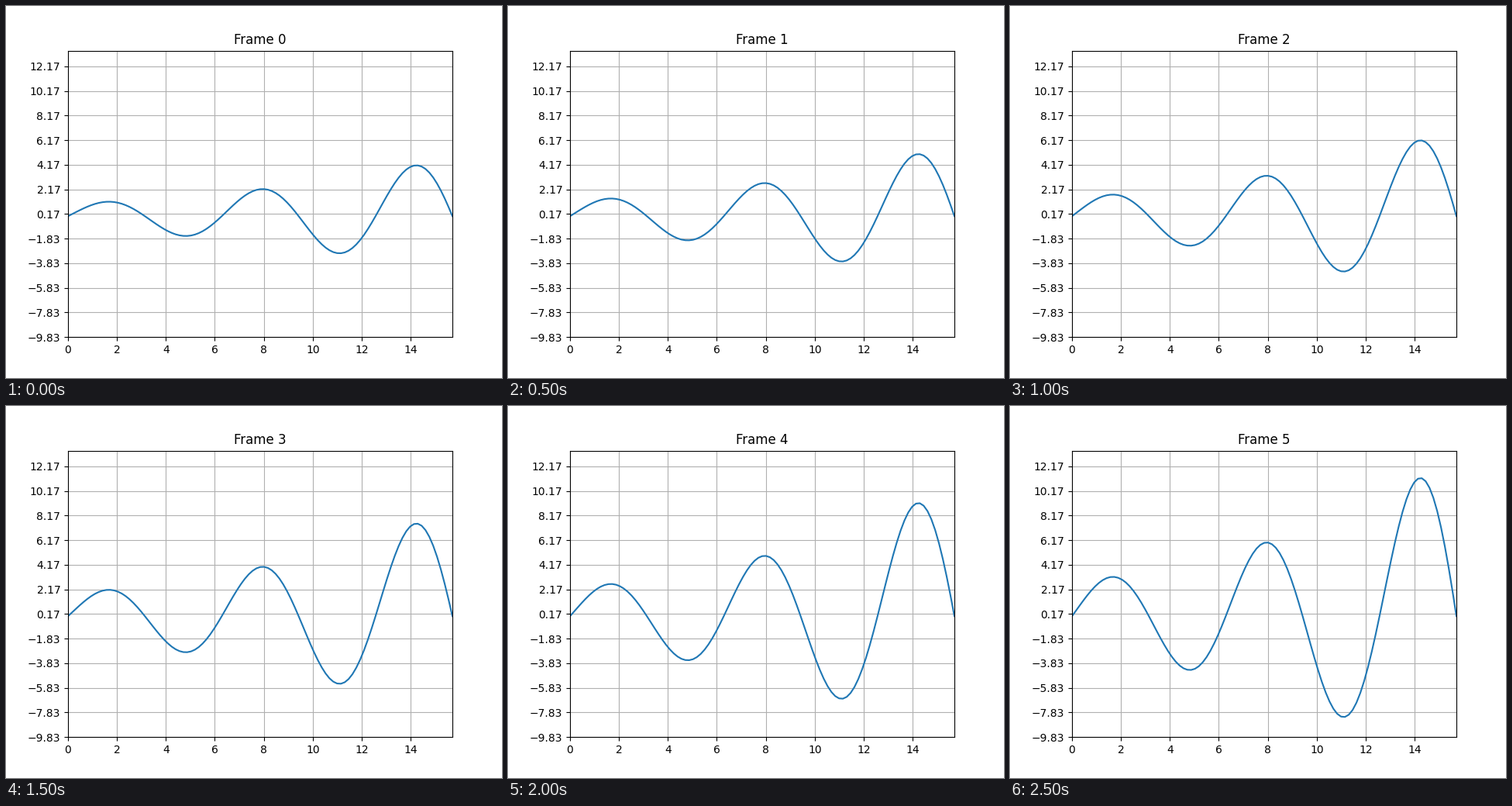
A matplotlib script for the animation above (3000 ms loop, 640 by 480 pixels).

```python
import numpy as np
import matplotlib.pyplot as plt
from matplotlib.animation import FuncAnimation

FRAMES = 6
INTERVAL = 500  # ms

x = np.linspace(0, 5 * np.pi, 101)


def wave(step):
    """Growing sine whose amplitude rises exponentially with each step."""
    return np.exp(0.2 * step) * np.exp(0.1 * x) * np.sin(x)


largest = wave(FRAMES - 1)
low, high = 1.2 * largest.min(), 1.2 * largest.max()

fig, ax = plt.subplots(figsize=(6.4, 4.8), dpi=100)
line, = ax.plot(x, wave(0))
ax.set_xlim(x[0], x[-1])
ax.set_ylim(low, high)
ax.set_xticks(np.arange(0, x[-1], 2))
ax.set_yticks(np.arange(low, high, 2))
ax.grid(True)
title = ax.set_title("Frame 0")


def update(step):
    line.set_ydata(wave(step))
    title.set_text(f"Frame {step}")
    return line, title


anim = FuncAnimation(fig, update, frames=FRAMES, interval=INTERVAL,
                     repeat=True, repeat_delay=0)
plt.show()
```
